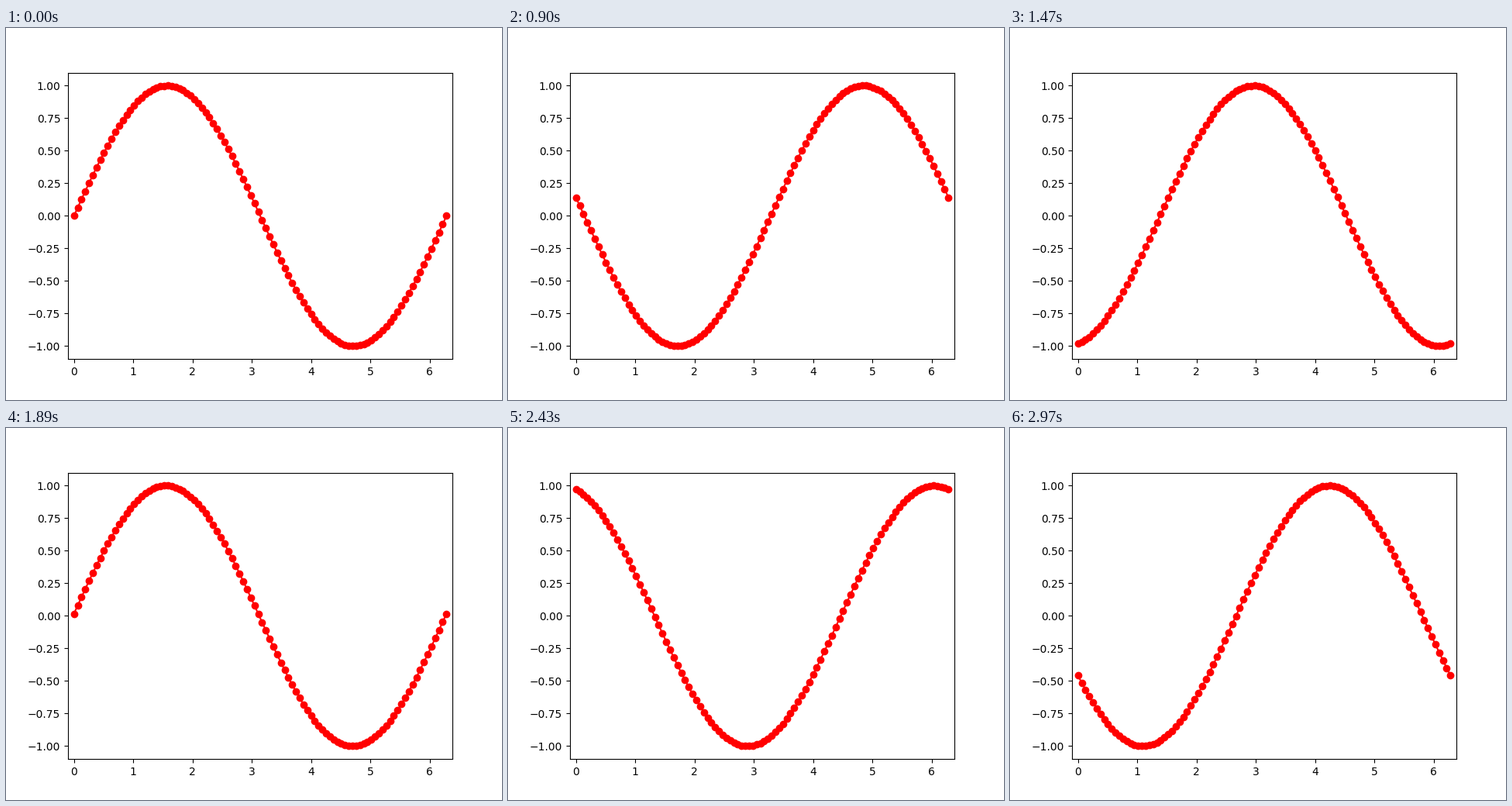
A matplotlib script that plays this animation: 640x480 px, repeating every 3 s.

```python
import numpy as np
import matplotlib.pyplot as plt
from matplotlib.animation import FuncAnimation

FRAMES = 100
INTERVAL = 30  # ms
PHASE_STEP = 0.1  # radians per frame
MARGIN = 0.1  # data units around the curve

fig, ax = plt.subplots(figsize=(6.4, 4.8), dpi=100)
ax.set_xlim(-MARGIN, 2 * np.pi + MARGIN)
ax.set_ylim(-1 - MARGIN, 1 + MARGIN)

x = np.linspace(0, 2 * np.pi, 100)
line, = ax.plot(x, np.sin(x), "ro-")


def update(i):
    line.set_ydata(np.sin(x + PHASE_STEP * i))
    return line,


anim = FuncAnimation(fig, update, frames=FRAMES, interval=INTERVAL,
                     repeat=True, repeat_delay=0, blit=False)
plt.show()
```
